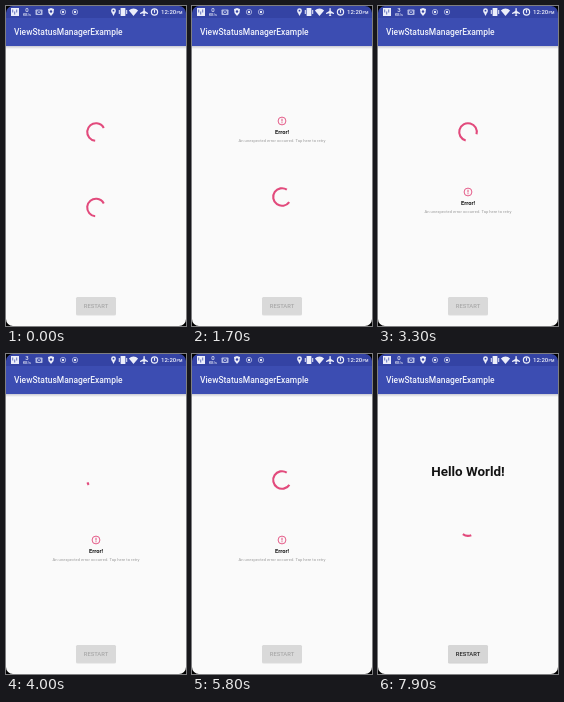
An HTML page with a canvas that plays this animation: 180x320 px, repeating every 8 s.

```html
<!DOCTYPE html>
<html lang="en">
<head>
<meta charset="utf-8">
<title>View status demo</title>
<style>
html, body { margin: 0; width: 100%; height: 100%; overflow: hidden; background: #000; }
canvas { display: block; width: 180px; height: 320px; }
</style>
</head>
<body>
<canvas id="stage"></canvas>
<script>
const LOOP = 8000;
const TAU = Math.PI * 2;
const PINK = '#e24a7c';
const FONT = 'Roboto, "Open Sans", sans-serif';

const canvas = document.getElementById('stage');
const ratio = window.devicePixelRatio || 1;
canvas.width = 180 * ratio;
canvas.height = 320 * ratio;
const ctx = canvas.getContext('2d');
ctx.scale(ratio, ratio);

// Moments at which the screen changes
const TOP_ERROR = 1400, BOTTOM_ERROR = 2850, TOP_RETRY = 3300;
const HELLO = 5950, BOTTOM_RETRY = 6167;

// Each run: reference time, phase there, cycle length, base angle, turn per cycle
const RUNS = {
  first: { at: 0, phase: 0.3, period: 1480, angle: 115, turn: 234 },
  waiting: { at: 1700, phase: 0.449, period: 1480, angle: 80, turn: 100 },
  retryTop: { at: 4000, phase: 0.03, period: 1250, angle: 229, turn: 234 },
  retryBottom: { at: BOTTOM_RETRY, phase: 0, period: 1548, angle: -14, turn: 234 }
};

function text(str, x, y, size, color, weight = 400, align = 'center') {
  ctx.font = `${weight} ${size}px ${FONT}`;
  ctx.fillStyle = color;
  ctx.textAlign = align;
  ctx.textBaseline = 'alphabetic';
  ctx.fillText(str, x, y);
}

function rect(x, y, w, h, color, radius = 0) {
  ctx.fillStyle = color;
  ctx.beginPath();
  ctx.roundRect(x, y, w, h, radius);
  ctx.fill();
}

function disc(x, y, r, color) {
  ctx.fillStyle = color;
  ctx.beginPath();
  ctx.arc(x, y, r, 0, TAU);
  ctx.fill();
}

function ring(x, y, r, color, width, from = 0, to = TAU) {
  ctx.strokeStyle = color;
  ctx.lineWidth = width;
  ctx.beginPath();
  ctx.arc(x, y, r, from, to);
  ctx.stroke();
}

function poly(points, color) {
  ctx.fillStyle = color;
  ctx.beginPath();
  points.forEach(([x, y]) => ctx.lineTo(x, y));
  ctx.fill();
}

// Cubic ease finishing at x = 0.5, flat on both sides
function ease(x) {
  if (x <= 0) return 0;
  if (x >= 0.5) return 1;
  let lo = 0, hi = 1;
  for (let i = 0; i < 24; i++) {
    const s = (lo + hi) / 2, r = 1 - s;
    const px = 0.6 * s * r * r + 0.3 * s * s * r + 0.5 * s ** 3;
    if (px < x) lo = s; else hi = s;
  }
  return lo * lo * (3 - 2 * lo);
}

function spinner(y, t, run) {
  const total = run.phase + (t - run.at) / run.period;
  const cycle = Math.floor(total);
  const u = total - cycle;
  const base = run.angle + run.turn * total + 270 * cycle - 90;
  const tail = base + 270 * ease(u - 0.5);
  const head = Math.max(base + 270 * ease(u), tail + 18);
  ring(90, y, 8.8, PINK, 2.1, tail * TAU / 360, head * TAU / 360);
}

function errorView(y) {
  ring(90, y, 3.9, PINK, 0.9);
  rect(89.5, y - 2.2, 1, 2.8, PINK);
  rect(89.5, y + 1.3, 1, 1, PINK);
  text('Error!', 90, y + 13, 5.7, '#161616', 700);
  text('An unexpected error occurred. Tap here to retry', 90, y + 20.6, 4.18, '#9b9b9b');
}

function statusBar(t) {
  const white = '#eceefa', dim = '#b4bce3', back = '#3443a4';
  rect(0, 0, 180, 12, back);
  rect(5, 2, 8, 8, white);
  for (let i = 0; i < 3; i++) rect(6.2 + 2 * i, 3.5 + i % 2 * 2, 1, 3, '#6572bd');
  text(t >= 2000 && t < 4950 ? '3' : '0', 21, 6.2, 6, white, 500);
  text('KB/s', 21, 10, 3.6, white, 500);

  rect(29.5, 3.5, 7, 5.5, dim, 0.8);
  disc(33, 6.2, 1.9, back);
  disc(33, 6.2, 0.9, dim);
  poly([[42, 3], [45, 2], [48, 3], [47.5, 7], [45, 10], [42.5, 7]], white);
  disc(45, 5.5, 1.2, back);
  for (const x of [57, 69]) {
    ring(x, 6, 2.7, dim, 0.8);
    disc(x, 6, 1.2, white);
  }

  disc(107.5, 4.7, 2.4, white);
  poly([[105.3, 5.6], [109.7, 5.6], [107.5, 10]], white);
  disc(107.5, 4.7, 0.9, back);
  rect(114.6, 2, 4.8, 8, white, 0.6);
  rect(112.8, 4, 1, 4, white);
  rect(120.2, 4, 1, 4, white);
  ctx.fillStyle = white;
  ctx.beginPath();
  ctx.moveTo(127.5, 10);
  ctx.arc(127.5, 9, 6.5, -2.36, -0.78);
  ctx.fill();
  poly([[137.6, 2], [138.6, 2], [138.9, 5], [142, 7], [142, 8], [138.9, 7.2],
    [138.6, 9], [139.6, 10], [136.6, 10], [137.6, 9], [137.3, 7.2], [134, 8],
    [134, 7], [137.3, 5]], white);
  ring(148.5, 6, 3.1, white, 1.2);
  rect(147.9, 3.6, 1.2, 3.2, white);
  text('12:20', 155, 8.4, 6, white, 500, 'left');
  text('PM', 176.5, 8.4, 3.9, white, 500, 'right');
}

function chrome(t) {
  rect(0, 0, 180, 320, '#fafafa');
  const shadow = ctx.createLinearGradient(0, 40, 0, 43);
  shadow.addColorStop(0, '#c9cad2');
  shadow.addColorStop(1, '#fafafa');
  rect(0, 40, 180, 3, shadow);
  rect(0, 12, 180, 28, '#3c4db2');
  statusBar(t);
  text('ViewStatusManagerExample', 8, 29.2, 8.45, '#f0f2fb', 500, 'left');

  const enabled = t >= HELLO;
  rect(70, 291.5, 40, 18, enabled ? '#cfcfcf' : '#dedede', 1.5);
  rect(70, 291, 40, 17.8, enabled ? '#d6d6d6' : '#d9d9d9', 1.5);
  text('RESTART', 90, 302.2, 5.8, enabled ? '#252525' : '#a9a9a9', 500);
}

function content(t) {
  let lift = 0;
  if (t >= HELLO) {
    lift = 28.5;
    text('Hello World!', 90, 121.8, 13.4, '#141414', 700);
  } else if (t >= TOP_ERROR && t < TOP_RETRY) {
    lift = 10.5;
    errorView(115);
  } else {
    spinner(126, t, t < TOP_ERROR ? RUNS.first : RUNS.retryTop);
  }

  if (t >= BOTTOM_ERROR && t < BOTTOM_RETRY) {
    errorView(186 - lift);
  } else {
    const run = t < TOP_ERROR ? RUNS.first : t < BOTTOM_ERROR ? RUNS.waiting : RUNS.retryBottom;
    spinner(201.5 - lift, t, run);
  }
}

function corners() {
  ctx.fillStyle = '#000';
  ctx.beginPath();
  ctx.rect(0, 0, 180, 320);
  ctx.roundRect(0, 0, 180, 320, 7);
  ctx.fill('evenodd');
}

const start = performance.now();
function frame() {
  const t = (performance.now() - start) % LOOP;
  chrome(t);
  content(t);
  corners();
  requestAnimationFrame(frame);
}
frame();
</script>
</body>
</html>
```
